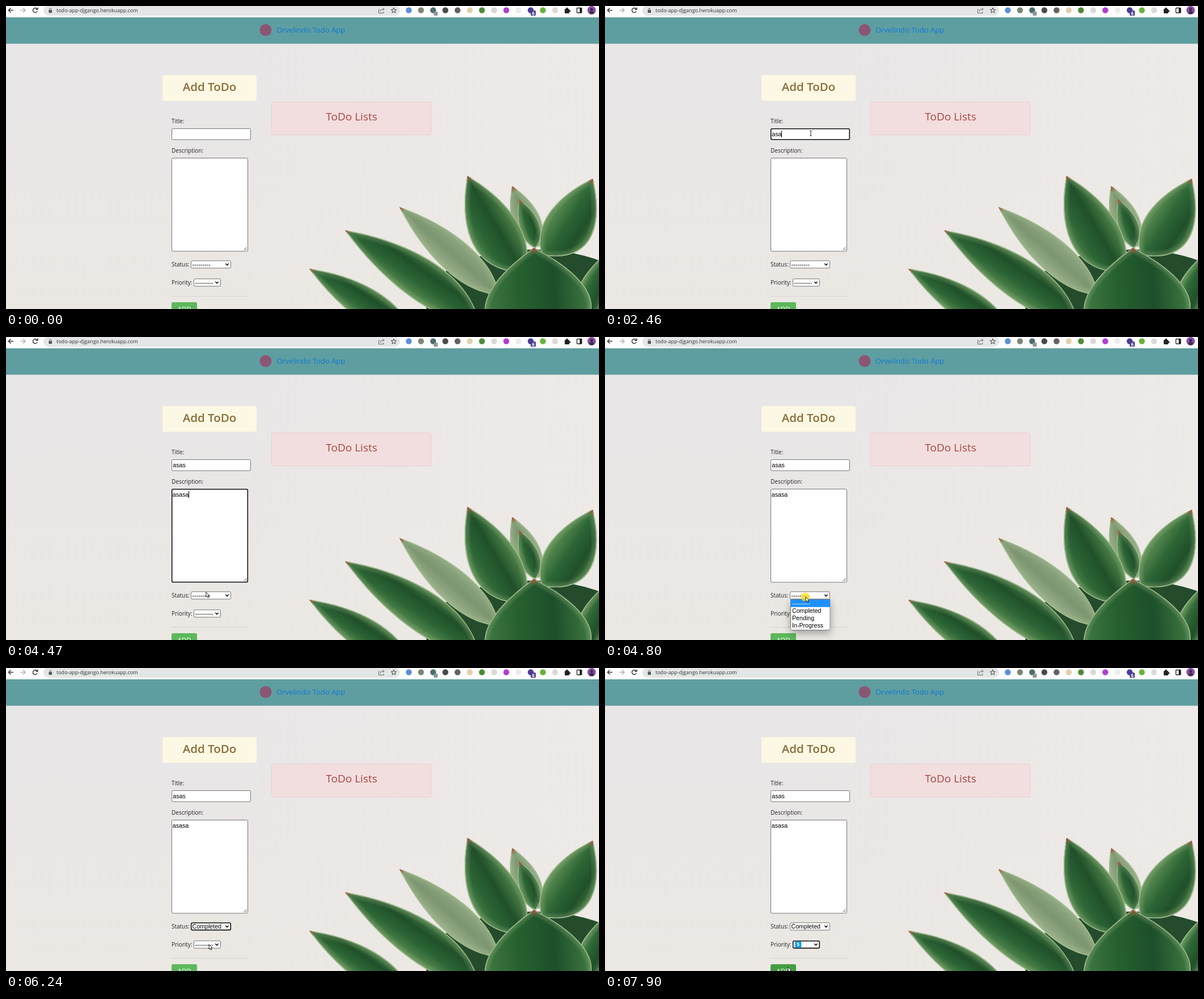
These frames come from a looping animation (1046 px wide and 535 px high, 8000 ms). An HTML page with a canvas:

```html
<!DOCTYPE html>
<html lang="en">
<head>
<meta charset="utf-8">
<title>Todo App</title>
<style>
  html, body { margin: 0; width: 100%; height: 100%; overflow: hidden; background: #eae7e6; }
  canvas { display: block; }
</style>
</head>
<body>
<canvas id="stage" width="1046" height="535"></canvas>
<script>
const W = 1046, H = 535, LOOP = 8000;
const UI = '"Open Sans", "Noto Sans", sans-serif';
const FORM = '10.67px "Liberation Sans", Arial, sans-serif';
const DASHES = '---------';
const BLUE = '#1e90ff', INK = '#222';

// Moments at which the pointer clicks.
const CLICK = { title: 800, note: 3330, status: 4730, done: 5580, priority: 6390, five: 7110 };
const FLASH = 140, POPUP_DELAY = 65;

const stage = document.getElementById('stage').getContext('2d');
let g = stage;

const between = (t, a, b) => t >= a && t < b;
const mix = (a, b, k) => a + (b - a) * k;
const smooth = u => u * u * (3 - 2 * u);

function box(x, y, w, h, r, fill, stroke, width = 1) {
  g.beginPath();
  g.roundRect(x, y, w, h, r);
  if (fill) { g.fillStyle = fill; g.fill(); }
  if (stroke) { g.strokeStyle = stroke; g.lineWidth = width; g.stroke(); }
}

function disc(x, y, r, fill) {
  g.beginPath();
  g.arc(x, y, r, 0, Math.PI * 2);
  g.fillStyle = fill;
  g.fill();
}

function text(s, x, y, font, color, align = 'left') {
  g.font = font;
  g.fillStyle = color;
  g.textAlign = align;
  g.fillText(s, x, y);
}

function line(points, color, width = 1) {
  g.beginPath();
  points.forEach(([x, y]) => g.lineTo(x, y));
  g.strokeStyle = color;
  g.lineWidth = width;
  g.stroke();
}

function gradient(x0, y0, x1, y1, colors) {
  const fill = g.createLinearGradient(x0, y0, x1, y1);
  colors.forEach((c, i) => fill.addColorStop(i / (colors.length - 1), c));
  return fill;
}

// A leaf grows wider from tip to base; bend moves its belly sideways.
function leaf(tip, base, wide, bend, tones) {
  const [tx, ty] = tip, [bx, by] = base;
  const len = Math.hypot(bx - tx, by - ty);
  const nx = (ty - by) / len, ny = (bx - tx) / len;
  const at = (k, off) => [mix(tx, bx, k) + nx * off, mix(ty, by, k) + ny * off];
  const near = side => at(.3, (bend + side * wide) * .6);
  const far = side => at(.75, bend + side * wide);
  g.save();
  g.beginPath();
  g.moveTo(tx, ty);
  g.bezierCurveTo(...near(1), ...far(1), bx, by);
  g.bezierCurveTo(...far(-1), ...near(-1), tx, ty);
  g.fillStyle = gradient(...at(.5, bend + wide * .6), ...at(.5, bend - wide * .6), tones);
  g.fill();
  g.clip();
  g.strokeStyle = 'rgba(160,195,140,.08)';
  for (let w = 20; w > 4; w -= 4) { g.lineWidth = w; g.stroke(); }
  g.strokeStyle = '#a3bf92';
  g.lineWidth = 3;
  g.stroke();
  const tint = g.createRadialGradient(tx, ty, 1, tx, ty, 12);
  tint.addColorStop(0, '#9c5236');
  tint.addColorStop(1, 'rgba(156,82,54,0)');
  disc(tx, ty, 12, tint);
  g.restore();
}

function plant() {
  const deep = ['#55874f', '#2b6535', '#205029', '#4b7f48'];
  const pale = ['#9aae8b', '#7c9671', '#8fa683'];
  g.beginPath();
  g.ellipse(930, 522, 190, 92, 0, 0, Math.PI * 2);
  g.fillStyle = '#244c2c';
  g.fill();
  leaf([694, 355], [870, 510], 48, 0, pale);
  leaf([893, 318], [940, 425], 40, 3, pale);
  leaf([905, 341], [934, 428], 30, -4, deep);
  leaf([814, 300], [915, 470], 72, 16, deep);
  leaf([1035, 305], [945, 440], 70, -20, deep);
  leaf([1075, 425], [1010, 560], 45, 0, deep);
  leaf([598, 396], [835, 560], 60, -9, deep);
  leaf([535, 464], [720, 590], 48, -8, deep);
  leaf([931, 427], [944, 610], 155, 0, ['#3f7842', '#26602f', '#1d4f2a', '#3f7842']);
}

function arrow(x, dir, color) {
  line([[x - 4.5 * dir, 7.5], [x + 4 * dir, 7.5]], color, 1.3);
  line([[x, 3.5], [x + 4 * dir, 7.5], [x, 11.5]], color, 1.3);
}

function toolbarIcons() {
  const x = i => 710.5 + i * 21.5;
  ['#5c8dd8', '#7d8673', '#4b6b6c', '#4a4a4a', '#675f5e', '#e3cfae', '#4d8a35',
    '#d9d9d6', '#b03fce', '#ececec', '#4b3b93', '#68b23a', '#dcdad8']
    .forEach((color, i) => disc(x(i), 7.5, 5.2, color));
  box(x(2) + 1, 10, 7, 7, 1, '#8b9796');
  box(x(10), 8, 9, 9, 1.5, '#4a3a8c');
  text('6', x(10) + 4.5, 15.6, 'bold 8px ' + UI, '#fff', 'center');
  box(985.5, 5, 8, 8, 1, INK);
  disc(989.5, 4.5, 1.8, INK);
  disc(994, 9, 1.8, INK);
  box(1007, 3.5, 8.5, 8.5, 1, null, INK, 1.3);
  box(1012, 3.5, 4, 8.5, 0, INK);
  disc(x(15), 7.5, 7.5, '#8e4bab');
  disc(x(15), 6, 2.6, '#3a3145');
  box(x(15) - 4, 9, 8, 5, 2.5, '#3a3145');
}

function browserBar() {
  g.fillStyle = '#fff';
  g.fillRect(0, 0, W, 20);
  box(66, -1, 629, 18, 9, '#e4e5e6');
  arrow(8.5, -1, INK);
  arrow(30, 1, '#aaa');
  g.beginPath();
  g.arc(51.5, 7.5, 4, .4, 5.6);
  g.strokeStyle = INK;
  g.lineWidth = 1.3;
  g.stroke();
  line([[56, 2.5], [56, 6], [52.5, 6]], INK, 1.3);
  box(75.5, 7, 5.5, 5, .5, '#555');
  box(76.7, 4.2, 3, 4, 1.5, null, '#555');
  text('todo-app-djgango.herokuapp.com', 89, 11, '9px ' + UI, '#303236');

  line([[659, 6], [657.5, 6], [657.5, 12.5], [666, 12.5], [666, 10]], '#666');
  line([[660, 10], [661.5, 6.5], [667, 5.5]], '#666');
  line([[664.5, 3], [667, 5.5], [664.5, 8]], '#666');
  line(Array.from({ length: 11 }, (_, i) => {
    const r = i % 2 ? 2.1 : 5, a = i * Math.PI / 5 - Math.PI / 2;
    return [684 + r * Math.cos(a), 8 + r * Math.sin(a)];
  }), '#444');
  toolbarIcons();
}

function page() {
  g.fillStyle = gradient(0, 67, 0, H, ['#e9e6e8', '#e9e6e5', '#ebe8e3']);
  g.fillRect(0, 0, W, H);
  g.fillStyle = gradient(400, 0, W, 0, ['rgba(238,235,231,0)', 'rgba(238,235,231,.8)']);
  g.fillRect(400, 67, W - 400, H);
  plant();
  browserBar();
  g.fillStyle = '#5f9ea0';
  g.fillRect(0, 20, W, 46.6);
  disc(458, 42.5, 10.5, '#8b5674');
  text('Orvelindo Todo App', 477, 46.5, '13.1px ' + UI, '#0f78d8');

  box(276, 122, 166, 45.5, 3, '#fcf8e3');
  text('Add ToDo', 359, 150, '600 20.5px ' + UI, '#8a6d3b', 'center');
  box(468.5, 169.5, 281.5, 58, 3, '#f2dede', '#ebccd1');
  text('ToDo Lists', 609.5, 201.5, '19px ' + UI, '#a94442', 'center');

  const label = (s, y) => text(s, 292, y, '10px ' + UI, '#212529');
  label('Title:', 207);
  label('Description:', 259);
  label('Status:', 460);
  label('Priority:', 492);
  g.fillStyle = '#d6d3d1';
  g.fillRect(292, 512, 136, 1);
}

const backdrop = document.createElement('canvas');
backdrop.width = W;
backdrop.height = H;

function drawBackdrop() {
  g = backdrop.getContext('2d');
  page();
  g = stage;
}

// Each move: start, end, and the place it reaches.
const entry = [725, 414];
const moves = [
  [180, 610, 363, 225],
  [2860, 3330, 329, 273],
  [4070, 4530, 354, 459],
  [4950, 5510, 360, 484],
  [5700, 6240, 358, 488],
  [6460, 6780, 347, 471],
  [7270, 7850, 323, 528]
];

function pointerAt(t) {
  if (t < moves[0][0]) return null;
  let [px, py] = entry;
  for (const [from, to, x, y] of moves) {
    if (t < from) break;
    const k = smooth(Math.min(1, (t - from) / (to - from)));
    px = mix(px, x, k);
    py = mix(py, y, k);
  }
  return [px, py];
}

const inside = (p, x, y, w, h) => p && p[0] >= x && p[0] <= x + w && p[1] >= y && p[1] <= y + h;

function field(x, y, w, h, focused) {
  if (focused) box(x + .7, y + .7, w - 1.4, h - 1.4, 2, '#fff', '#101010', 1.6);
  else box(x + .5, y + .5, w - 1, h - 1, 2, '#fff', '#767676');
}

// Types the word at an even pace; the caret blinks from the last key on.
function typed(t, word, x, y, { first, pace, click, focused }) {
  const count = Math.max(0, Math.min(word.length, Math.floor((t - first) / pace) + 1));
  const value = word.slice(0, count);
  text(value, x, y, FORM, '#000');
  const last = count ? first + (count - 1) * pace : click + FLASH;
  const lit = Math.floor((t - last) / 535) % 2 === 0;
  if (focused && lit) g.fillRect(Math.round(x + g.measureText(value).width), y - 9.5, 1, 12);
}

function keycap(n, x, y) {
  box(x, y - 5.5, 11, 11, 1.5, '#0a9fe8');
  text(n, x + 5.5, y + 3, 'bold 8.5px ' + UI, '#fff', 'center');
}

function select(x, y, w, focused) {
  field(x, y, w, 14, focused);
  const ax = x + w - 7;
  line([[ax - 2.6, y + 5.5], [ax, y + 8.3], [ax + 2.6, y + 5.5]], '#111', 1.5);
}

function popup(x, y, w, h, radii) {
  g.save();
  g.shadowColor = 'rgba(0,0,0,.32)';
  g.shadowBlur = 14;
  g.shadowOffsetY = 5;
  box(x, y, w, h, radii, '#fff');
  g.restore();
  box(x + .5, y + .5, w - 1, h - 1, radii, null, '#767676');
}

function statusPopup(p) {
  popup(327, 463, 70.5, 55, [0, 0, 3, 3]);
  const row = p[1] < 477 ? 0 : 1;
  g.fillStyle = BLUE;
  g.fillRect(327.5, 463.5 + row * 13.3, 69.5, 13.3);
  [DASHES, 'Completed', 'Pending', 'In-Progress'].forEach((s, i) =>
    text(s, 330, 473.8 + i * 13.2, FORM, i === row ? '#fff' : '#000'));
}

function priorityPopup(p) {
  popup(331.5, 391, 47, 90.5, [4, 4, 0, 0]);
  const row = p[1] < 481 ? 5 : 0;
  g.fillStyle = BLUE;
  g.fillRect(332, 391 + row * 15, 46, 15);
  text(DASHES, 334, 401.7, FORM, row ? '#000' : '#fff');
  for (let n = 1; n <= 5; n++) keycap(n, 336, 398 + n * 15);
}

function beam(x, y) {
  line([[x, y - 4.5], [x, y + 4]], '#333');
  for (const end of [y - 4.5, y + 4]) line([[x - 2, end], [x + 2, end]], '#333');
}

function arrowPointer(x, y) {
  g.beginPath();
  [[0, 0], [0, 8.5], [2, 6.7], [3.3, 9.8], [4.8, 9.1], [3.5, 6.2], [6, 6.1]]
    .forEach(([dx, dy]) => g.lineTo(x + dx, y + dy));
  g.closePath();
  g.fillStyle = '#fff';
  g.fill();
  g.strokeStyle = INK;
  g.lineWidth = 1;
  g.stroke();
}

function draw(t) {
  const p = pointerAt(t);
  const chosen = CLICK.done + POPUP_DELAY, rated = CLICK.five + POPUP_DELAY;
  const statusOpen = between(t, CLICK.status + POPUP_DELAY, chosen);
  const priorityOpen = between(t, CLICK.priority + POPUP_DELAY, rated);
  const titleFocus = between(t, CLICK.title, CLICK.note);
  const noteFocus = between(t, CLICK.note, CLICK.status);
  g.drawImage(backdrop, 0, 0);

  field(292, 216, 140, 20.5, titleFocus);
  typed(t, 'asas', 294.3, 229.7, { first: 2060, pace: 180, click: CLICK.title, focused: titleFocus });
  field(292, 268, 135, 165.5, noteFocus);
  typed(t, 'asasa', 293.8, 281.8, { first: 3720, pace: 120, click: CLICK.note, focused: noteFocus });
  line([[419.5, 431], [424.5, 426]], '#555');
  line([[422.5, 431], [424.5, 429]], '#555');

  select(326, 449.3, 71, between(t, chosen, CLICK.priority));
  text(t < chosen ? DASHES : 'Completed', 328.5, 460, FORM, '#000');
  select(331, 481.3, 48, t >= rated);
  if (t < rated) text(DASHES, 333.5, 492, FORM, '#000');
  else keycap(5, 335.3, 488.3);

  box(292, 523, 45, 24, 3, inside(p, 292, 523, 45, 20) ? '#449d44' : '#5cb85c');
  text('ADD', 314.5, 539.3, '11.5px ' + UI, '#fff', 'center');

  if (statusOpen) statusPopup(p);
  if (priorityOpen) priorityPopup(p);
  if (!p) return;
  if (Object.values(CLICK).some(c => between(t, c, c + FLASH))) disc(p[0] - .5, p[1], 7.8, 'rgba(250,225,20,.72)');
  const overText = inside(p, 292, 216, 140, 20) || inside(p, 292, 268, 135, 165);
  if (overText) beam(...p);
  else arrowPointer(...p);
}

drawBackdrop();
const start = performance.now();
function tick() {
  draw((performance.now() - start) % LOOP);
  requestAnimationFrame(tick);
}
tick();
</script>
</body>
</html>
```
